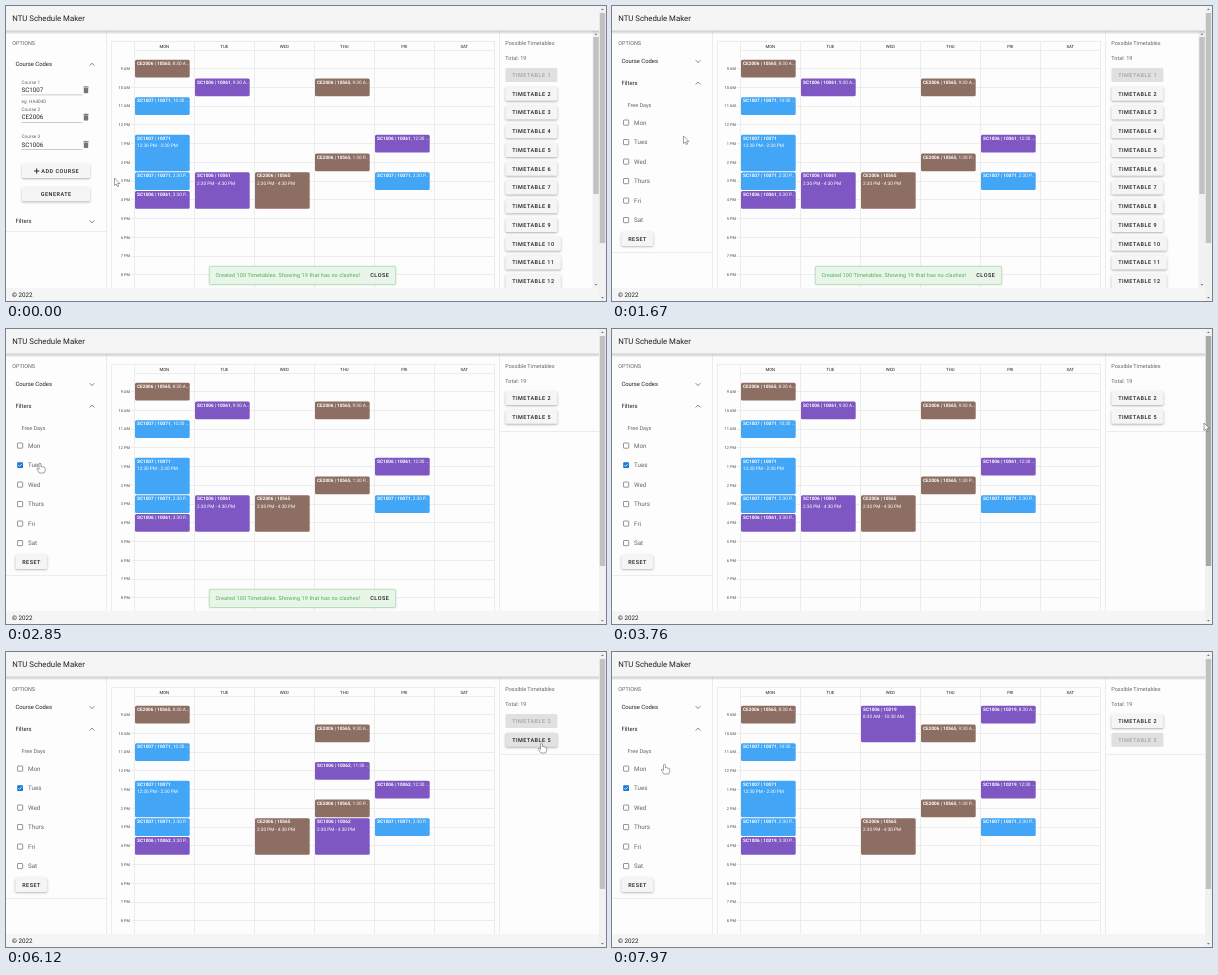
Recreate the animation shown at these times as an HTML page with a canvas. Size 600x295 px, loop 8 s.

```html
<!DOCTYPE html>
<html lang="en">
<head>
<meta charset="utf-8">
<title>Schedule maker</title>
<style>
html, body { margin: 0; width: 100%; height: 100%; overflow: hidden; background: #fdfdfd; }
canvas { display: block; width: 600px; height: 295px; }
</style>
</head>
<body>
<canvas id="stage" width="600" height="295"></canvas>
<script>
const ctx = document.getElementById('stage').getContext('2d');
const LOOP = 8000;
const INK = 'rgba(0,0,0,.87)', SOFT = 'rgba(0,0,0,.6)', LINE = '#ececec';
const BROWN = '#8d6e63', PURPLE = '#7e57c2', BLUE = '#42a5f5';

// When the state changes, in ms
const EXPAND = 1420, TICK = 2850, TOAST_END = 3420, PICK_2 = 5360, PICK_5 = 6210;

// Pointer tip: time, x, y
const PATH = [
  [30, 108.5, 172], [270, 285, 267], [500, 541, 68], [570, 540, 76], [840, 211, 167],
  [1200, 85, 215], [1430, 85, 215], [1660, 71.5, 130], [1850, 71.5, 130],
  [2300, 40, 135], [2580, 34, 134], [3300, 34, 134], [3740, 592, 94], [3840, 592, 94],
  [4090, 551, 127], [4600, 545.5, 67.5], [5680, 545.5, 67.5], [6100, 535.5, 91],
  [6640, 535.5, 91], [7000, 413, 104], [7780, 52.5, 112]
];
const HAND = [[1130, 1500], [2150, 3340], [4400, 6700], [7550, LOOP]];

const clamp = v => Math.max(0, Math.min(1, v));
const ease = v => { v = clamp(v); return v * v * (3 - 2 * v); };
const mix = (a, b, k) => a + (b - a) * k;
const between = (t, a, b) => t >= a && t < b;

function box(x, y, w, h, color) {
  ctx.fillStyle = color;
  ctx.fillRect(x, y, w, h);
}

function round(x, y, w, h, r, color) {
  ctx.beginPath();
  ctx.roundRect(x, y, w, h, r);
  ctx.fillStyle = color;
  ctx.fill();
}

// y is the middle of the line; returns the advance width
function text(str, x, y, size, color = INK, { weight = 400, align = 'left', gap = 0 } = {}) {
  ctx.font = `${weight} ${size}px Roboto, sans-serif`;
  ctx.textRendering = 'geometricPrecision';
  ctx.letterSpacing = gap + 'px';
  ctx.textAlign = align;
  ctx.fillStyle = color;
  ctx.fillText(str, x, y + size * 0.355);
  return ctx.measureText(str).width;
}

function stroke(points, color, width) {
  ctx.beginPath();
  points.forEach(([x, y]) => ctx.lineTo(x, y));
  ctx.strokeStyle = color;
  ctx.lineWidth = width;
  ctx.stroke();
}

function shadow(blur, dy, alpha, draw) {
  ctx.save();
  ctx.shadowColor = `rgba(0,0,0,${alpha})`;
  ctx.shadowBlur = blur;
  ctx.shadowOffsetY = dy;
  draw();
  ctx.restore();
}

function clipped(x, y, w, h, draw) {
  if (h <= 0) return;
  ctx.save();
  ctx.beginPath();
  ctx.rect(x, y, w, h);
  ctx.clip();
  draw();
  ctx.restore();
}

function button(label, x, y, w, { hover = false, disabled = false, shift = 0 } = {}) {
  const face = () => round(x, y - 7, w, 14, 1.5, disabled ? '#e0e0e0' : hover ? '#e2e2e2' : '#f5f5f5');
  if (disabled) face(); else shadow(2.2, 0.9, 0.3, face);
  text(label, x + w / 2 + shift + 0.2, y, 5.47, disabled ? 'rgba(0,0,0,.27)' : INK,
    { weight: 500, align: 'center', gap: 0.488 });
}

function chevron(x, y, turn) {
  const d = 1.2 * turn;
  stroke([[x - 2.3, y - d], [x, y + d], [x + 2.3, y - d]], 'rgba(0,0,0,.6)', 0.8);
}

function trash(x, y) {
  const c = '#757575';
  box(x - 2.7, y - 3.2, 5.4, 0.9, c);
  box(x - 1.2, y - 3.6, 2.4, 0.6, c);
  round(x - 2.2, y - 1.9, 4.4, 5.3, 0.7, c);
}

function header() {
  const g = ctx.createLinearGradient(0, 24, 0, 28.5);
  g.addColorStop(0, 'rgba(0,0,0,.24)');
  g.addColorStop(1, 'rgba(0,0,0,0)');
  box(0, 24, 593, 4.5, g);
  box(0, 0, 593, 24.6, '#f5f5f5');
  text('NTU Schedule Maker', 6.2, 11.8, 7.81);
}

function footer() {
  box(0, 282, 593, 13, '#f5f5f5');
  text('© 2022', 6, 289.2, 6.25);
}

function scrollbar(x, top, bottom, thumbTop, thumbBottom, color) {
  const mid = x + 3.4;
  box(x, top, 7, bottom - top, '#f1f1f1');
  box(x + 0.8, thumbTop, 5.4, thumbBottom - thumbTop, color);
  ctx.fillStyle = '#707070';
  for (const [y, d] of [[top + 3.4, -1], [bottom - 3.4, 1]]) {
    ctx.beginPath();
    ctx.moveTo(mid - 1.4, y - d * 0.7);
    ctx.lineTo(mid + 1.4, y - d * 0.7);
    ctx.lineTo(mid, y + d * 0.8);
    ctx.fill();
  }
}

function courseFields() {
  [['SC1007', 76], ['CE2006', 103.4], ['SC1006', 130.7]].forEach(([code, y], i) => {
    text('Course ' + (i + 1), 15.5, y, 4.69, SOFT);
    text(code, 15.5, y + 7.7, 6.25);
    box(15.5, y + 12.7, 61, 0.5, '#999');
    trash(80, y + 7.8);
  });
  text('eg. HA4040', 15.5, 95.6, 4.69, SOFT);
  button('ADD COURSE', 16, 165, 68, { shift: 4 });
  stroke([[28, 165], [33.4, 165]], INK, 0.9);
  stroke([[30.7, 162.3], [30.7, 167.7]], INK, 0.9);
  button('GENERATE', 16, 188.3, 68);
}

function freeDays(top, t) {
  text('Free Days', 15.5, top + 22.3, 5.47, SOFT);
  ['Mon', 'Tues', 'Wed', 'Thurs', 'Fri', 'Sat'].forEach((day, i) => {
    const y = top + 39.5 + i * 19.5;
    if (i === 1 && t >= TICK) {
      round(11.2, y - 2.9, 5.8, 5.8, 0.7, '#1976d2');
      stroke([[12.4, y], [13.6, y + 1.3], [15.9, y - 1.3]], '#fff', 0.8);
    } else {
      ctx.beginPath();
      ctx.roundRect(11.5, y - 2.6, 5.2, 5.2, 0.5);
      ctx.strokeStyle = '#757575';
      ctx.lineWidth = 0.75;
      ctx.stroke();
    }
    text(day, 22, y + 0.1, 6.25, SOFT);
  });
  button('RESET', 9.5, top + 155.8, 31.7);
}

function options(t) {
  const k = ease((t - EXPAND) / 250);
  const top = mix(58.4, 55.4, k), y = mix(215.4, 77.1, k), bottom = mix(225, 246, k);
  box(100, 25, 1, 257, LINE);
  text('OPTIONS', 6.2, 36.7, 5.47, SOFT);
  text('Course Codes', 9.4, top, 5.86);
  chevron(86, top, mix(-1, 1, k));
  clipped(0, 67, 100, y - 77, courseFields);
  text('Filters', 9.4, y, 5.86);
  chevron(86, y + 0.2, mix(1, -1, k));
  clipped(0, y + 9, 100, bottom - y - 9, () => freeDays(y, t));
  box(0, Math.round(bottom), 100, 1, LINE);
}

const hourY = h => 62.5 + (h - 9) * 18.75;

function clock(h) {
  const min = h % 1 ? '30' : '00', hour = Math.floor(h);
  return `${(hour + 11) % 12 + 1}:${min} ${hour < 12 ? 'AM' : 'PM'}`;
}

function lesson(name, color, day, start, hours) {
  const x = 129 + day * 60, y = hourY(start) + 0.7;
  round(x, y, 54.7, hours * 18.75 - 1, 1.5, color);
  const w = text(name, x + 2, y + 3.4, 4.69, '#fff', { weight: 700 });
  if (hours > 1) text(`${clock(start)} - ${clock(start + hours)}`, x + 2, y + 10.9, 4.69, '#fff');
  else text(`, ${clock(start).slice(0, 6)}…`, x + 2 + w, y + 3.4, 4.69, '#fff');
}

function calendar(t) {
  box(105, 35, 384, 1, LINE);
  box(105, 35, 1, 247, LINE);
  box(128, 44, 361, 1, LINE);
  ['MON', 'TUE', 'WED', 'THU', 'FRI', 'SAT'].forEach((day, i) => {
    text(day, 158.3 + i * 60, 40, 4.3, INK, { align: 'center' });
    box(128 + i * 60, 35, 1, 247, LINE);
  });
  box(488, 35, 1, 247, LINE);
  for (let h = 9; h <= 20; h++) {
    const y = hourY(h);
    box(125, Math.floor(y), 364, 1, LINE);
    text(`${(h + 11) % 12 + 1} ${h < 12 ? 'AM' : 'PM'}`, 123.8, y, 3.9, '#444', { align: 'right' });
  }
  const plan = t < PICK_2 ? ['10061', [1, 9.5, 1], [1, 14.5, 2]]
    : t < PICK_5 ? ['10062', [3, 11.5, 1], [3, 14.5, 2]]
    : ['10219', [2, 8.5, 2], [4, 8.5, 1]];
  const sets = [
    ['CE2006 | 10565', BROWN, [0, 8.5, 1], [3, 9.5, 1], [3, 13.5, 1], [2, 14.5, 2]],
    ['SC1007 | 10071', BLUE, [0, 10.5, 1], [0, 12.5, 2], [0, 14.5, 1], [4, 14.5, 1]],
    ['SC1006 | ' + plan[0], PURPLE, [0, 15.5, 1], [4, 12.5, 1], ...plan.slice(1)]
  ];
  for (const [name, color, ...slots] of sets)
    for (const slot of slots) lesson(name, color, ...slot);
}

function timetables(t) {
  const filtered = t >= TICK;
  const ids = filtered ? [2, 5] : Array.from({ length: 12 }, (_, i) => i + 1);
  const active = t < PICK_2 ? 1 : t < PICK_5 ? 2 : 5;
  const hovered = between(t, 4420, PICK_2) ? 2 : between(t, 5930, PICK_5) ? 5 : 0;
  box(493, 25, 1, 257, LINE);
  text('Possible Timetables', 499.3, 36.7, 5.47, SOFT);
  text('Total: 19', 499.3, 51.9, 5.47, SOFT);
  ids.forEach((id, i) => button('TIMETABLE ' + id, 499.4, 69 + i * 18.75, id > 9 ? 55.5 : 52,
    { disabled: id === active, hover: id === hovered }));
  if (filtered) box(493, 102, 100, 1, LINE);
  else scrollbar(586.5, 25, 282, 31, 188, '#c1c1c1');
}

function toast(t) {
  const alpha = 1 - clamp((t - TOAST_END) / 120);
  if (!alpha) return;
  ctx.save();
  ctx.globalAlpha = alpha;
  shadow(2, 0.5, 0.1, () => round(203, 260, 187, 18.8, 1.6, '#e8f5e9'));
  ctx.beginPath();
  ctx.roundRect(203.3, 260.3, 186.4, 18.2, 1.5);
  ctx.strokeStyle = '#8bcb8e';
  ctx.lineWidth = 0.5;
  ctx.stroke();
  text('Created 100 Timetables. Showing 19 that has no clashes!', 209.4, 269.3, 5.47, '#4caf50', { gap: 0.098 });
  text('CLOSE', 364.3, 269.3, 5.47, INK, { weight: 500, gap: 0.488 });
  ctx.restore();
}

function pointerAt(t) {
  const i = PATH.findIndex(p => p[0] > t);
  if (i <= 0) return (i ? PATH[PATH.length - 1] : PATH[0]).slice(1);
  const a = PATH[i - 1], b = PATH[i], k = ease((t - a[0]) / (b[0] - a[0]));
  return [mix(a[1], b[1], k), mix(a[2], b[2], k)];
}

const ARROW = new Path2D('M0 0V7.5L1.7 6L2.8 8.6L4.1 8L3 5.5H5.4Z');
const GLOVE = new Path2D('M-1 .8Q0 -.5 .9 .8V3.6Q2 3 2.6 4Q3.6 3.5 4 4.4Q5 4 5.2 5.2' +
  'V7.4L4.2 10H-.6L-3 6.4Q-3.3 5.2 -2.3 5.2L-1 6.3Z');

function pointer(t) {
  const [x, y] = pointerAt(t);
  const shape = HAND.some(([a, b]) => between(t, a, b)) ? GLOVE : ARROW;
  ctx.save();
  ctx.translate(x, y);
  ctx.fillStyle = '#fff';
  ctx.strokeStyle = '#555';
  ctx.lineWidth = 0.55;
  ctx.lineJoin = 'round';
  ctx.fill(shape);
  ctx.stroke(shape);
  ctx.restore();
}

function draw(now) {
  const t = now % LOOP;
  box(0, 0, 600, 295, '#fdfdfd');
  options(t);
  calendar(t);
  timetables(t);
  header();
  footer();
  scrollbar(593, 0, 295, 7, 237, between(t, 3720, 3880) ? '#a8a8a8' : '#c1c1c1');
  toast(t);
  pointer(t);
}

const begin = performance.now();
function frame() {
  draw(performance.now() - begin);
  requestAnimationFrame(frame);
}
frame();
</script>
</body>
</html>
```
